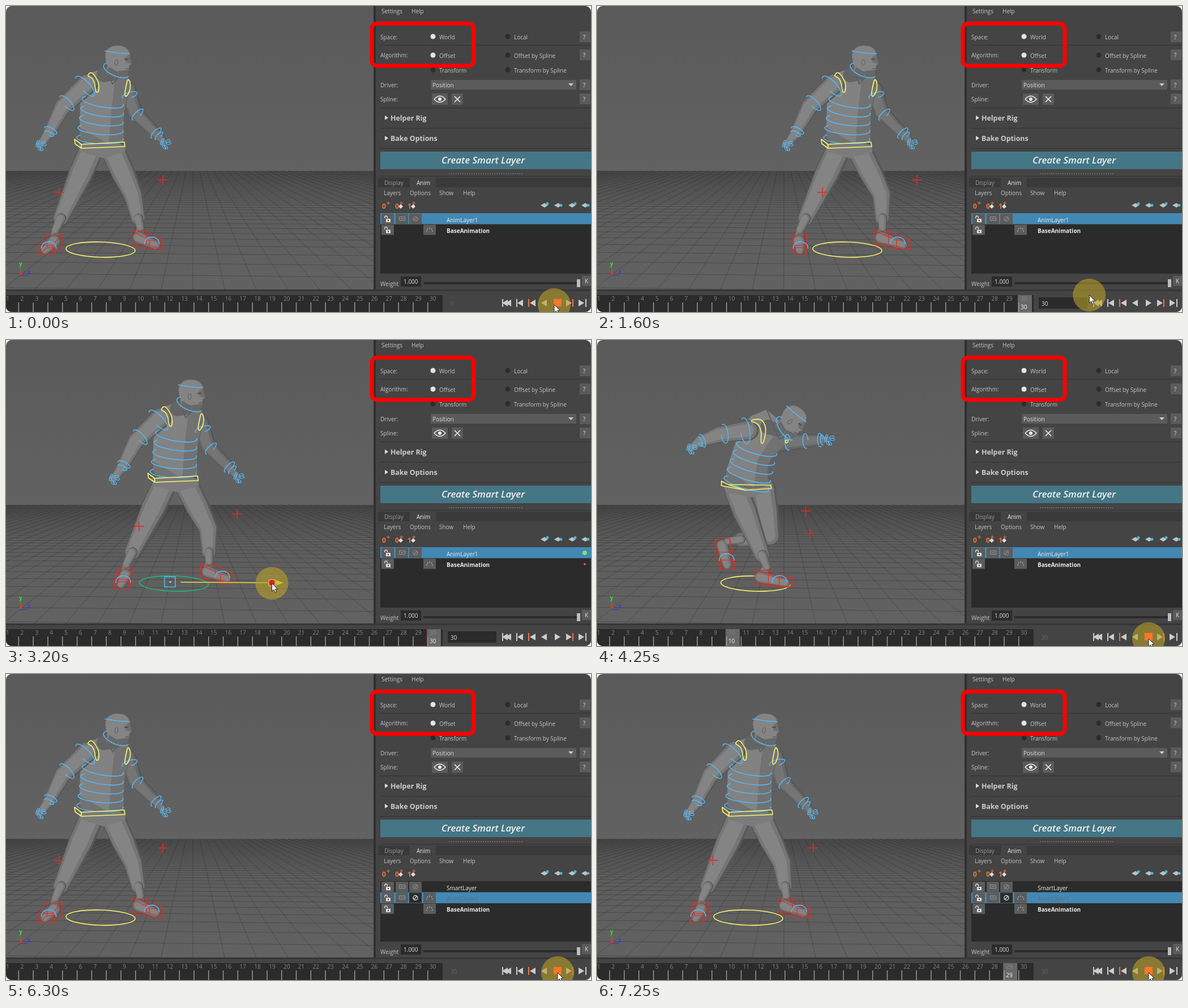
Animation of 1033x542 px, one loop 7.75 s. Source, as an HTML page with a canvas:

```html
<!DOCTYPE html>
<html lang="en">
<head>
<meta charset="utf-8">
<style>
html, body { margin: 0; width: 100%; height: 100%; overflow: hidden; background: #fff; }
canvas { display: block; }
</style>
</head>
<body>
<canvas id="stage" width="1033" height="542"></canvas>
<script>
const c = document.getElementById('stage').getContext('2d');
const LOOP = 7750, BLUE = '#52b8f5', YELLOW = '#f7f36e', RED = '#e8291f', ORANGE = '#f0743a';
const clamp = (v, a = 0, b = 1) => Math.min(b, Math.max(a, v));
const smooth = v => (v = clamp(v)) * v * (3 - 2 * v);
const mix = (a, b, k) => a + (b - a) * k;
const lerp = (p, q, k) => [mix(p[0], q[0], k), mix(p[1], q[1], k)];

// ---------- drawing helpers ----------
function rect(x, y, w, h, color) { c.fillStyle = color; c.fillRect(x, y, w, h); }
function trace(points, close) {
  c.beginPath();
  points.forEach(p => c.lineTo(p[0], p[1]));
  if (close) c.closePath();
}
function poly(points, color) { trace(points, true); c.fillStyle = color; c.fill(); }
function line(points, color, width = 1, close) {
  trace(points, close);
  c.strokeStyle = color; c.lineWidth = width; c.stroke();
}
function traceSmooth(points) {
  const n = points.length;
  c.beginPath();
  c.moveTo(...lerp(points[n - 1], points[0], .5));
  points.forEach((p, i) => c.quadraticCurveTo(...p, ...lerp(p, points[(i + 1) % n], .5)));
}
function loop(points, color, width) {
  traceSmooth(points);
  c.strokeStyle = color; c.lineWidth = width; c.stroke();
}
function disc(x, y, r, color) { c.beginPath(); c.arc(x, y, r, 0, 7); c.fillStyle = color; c.fill(); }
function oval(x, y, rx, ry, tilt, color, width = 1.5, from = 0, to = Math.PI * 2) {
  c.beginPath(); c.ellipse(x, y, rx, ry, tilt, from, to);
  c.strokeStyle = color; c.lineWidth = width; c.stroke();
}
function text(s, x, y, color = '#c4c4c4', size = 10, style = '') {
  c.font = `${style} ${size}px "Open Sans", "Noto Sans", sans-serif`;
  c.fillStyle = color; c.fillText(s, x, y);
}
function capsule(p, q, r1, r2, color) {
  const a = Math.atan2(q[1] - p[1], q[0] - p[0]), h = Math.PI / 2;
  c.beginPath();
  c.arc(...p, r1, a + h, a - h);
  c.arc(...q, r2, a - h, a + h);
  c.closePath(); c.fillStyle = color; c.fill();
}
function limb(joints, radii, shades = ['#595959', '#757575', '#848484']) {
  shades.forEach((color, layer) => {
    const scale = [1, .88, .62][layer];
    for (let i = 1; i < joints.length; i++) {
      const [p, q] = [joints[i - 1], joints[i]].map(j => [j[0] - layer, j[1]]);
      capsule(p, q, radii[i - 1] * scale, radii[i] * scale, color);
    }
  });
}
function ringOn(p, q, k, r) {
  const m = lerp(p, q, k), a = Math.atan2(q[1] - p[1], q[0] - p[0]) + Math.PI / 2;
  oval(...m, r, r * .36, a, BLUE, 1.5, -.4, 4.6);
}
function cross(x, y) {
  line([[x - 9, y], [x + 9, y]], RED, 1.5);
  line([[x, y - 9], [x, y + 9]], RED, 1.5);
}

// ---------- character ----------
// Pairs of poses, x relative to the ground control: standing, crouched.
const POSES = {
  torso: [[9,108, -25,122, -36,165, -36,190, -37,215, -38,244, 43,246, 41,215, 42,190, 46,165, 57,133, 39,118],
          [20,123, -20,140, -34,178, -44,205, -51,230, -56,259, 26,263, 21,238, 24,215, 40,198, 60,180, 65,163]],
  armL: [[-22,137, -66,178, -91,226, -106,246], [-12,160, -62,167, -98,180, -113,192]],
  armR: [[48,148, 61,188, 103,230, 114,243], [48,182, 85,179, 118,177, 130,176]],
  hips: [[-17,257, 23,258], [-32,270, 14,264]],
  head: [[29,96, 19,122], [64,142, 40,160]],
  clavL: [[-24,124, -17,116, -9,125, -3,137, -3,153, -9,153, -10,138, -15,127],
          [-12,143, 8,139, 16,147, 19,160, 14,184, 9,183, 11,162, 5,148]],
  clavR: [[48,128, 53,136, 52,150, 46,161, 42,158, 45,142], [54,177, 58,177, 58,180, 55,183, 53,181, 53,179]],
  belt: [[-34,245, 42,241, 43,249, -34,252, -45,244, -46,236], [-48,256, 27,257, 28,263, -18,266, -60,258, -60,250]]
};
function pose(name, w, x) {
  const [a, b] = POSES[name], out = [];
  for (let i = 0; i < a.length; i += 2) out.push([x + mix(a[i], b[i], w), mix(a[i + 1], b[i + 1], w)]);
  return out;
}
function knee(hip, ankle, thigh, shin) {
  const dx = ankle[0] - hip[0], dy = ankle[1] - hip[1], d = Math.hypot(dx, dy);
  if (d >= thigh + shin) return lerp(hip, ankle, thigh / (thigh + shin));
  const a = (thigh ** 2 - shin ** 2 + d * d) / (2 * d), h = Math.sqrt(Math.max(0, thigh ** 2 - a * a));
  return [hip[0] + (dx * a + dy * h) / d, hip[1] + (dy * a - dx * h) / d];
}
function shoe(ankle, heel, toe) {
  const at = o => [ankle[0] + o[0], ankle[1] + o[1]];
  limb([ankle, at(heel)], [7, 9]);
  limb([at(heel), at(toe)], [11, 8]);
  return [at(heel), at(toe)];
}
function footBox([heel, toe]) {
  const box = ([x, y], w, h) => [[x - w, y - h], [x + w, y - h], [x + w, y + h], [x - w, y + h]];
  const back = box(heel, 13, 12), front = box(toe, 12, 8);
  line(back, RED, 1.2, true);
  line(front, RED, 1.2, true);
  back.forEach((p, i) => line([p, front[i]], RED, 1.2));
  const m = lerp(heel, toe, .72);
  oval(m[0] + 1, m[1] + 1, 13, 11, 0, BLUE, 1.6, 3, 6.4);
}
function drawHead([x, y], tilt) {
  c.save(); c.translate(x, y); c.rotate(tilt);
  const face = new Path2D('M-21-5C-22-20-10-27 2-26C14-26 22-19 22-10L23-4L26 6L22 9L22 15L19 24Q16 31 7 28L0 20L-4 30L-19 25Q-15 12-19 5Z');
  c.fillStyle = '#848484'; c.fill(face);
  c.strokeStyle = '#666'; c.lineWidth = 1; c.stroke(face);
  c.save(); c.clip(face);
  poly([[0, 20], [22, 16], [18, 32], [-20, 32], [-14, 12]], '#686868');
  poly([[22, -12], [13, -3], [16, 4], [26, 6]], '#707070');
  line([[13, -2], [20, -2]], '#4c4c4c', 2);
  line([[15, 15], [22, 14]], '#555', 1.3);
  oval(-1, 4, 2.5, 5, .2, '#666', 1.2);
  c.restore();
  line([[-22, -16], [0, -13], [23, -12]], BLUE, 1.6);
  oval(-1, 18, 24, 10, .38, BLUE, 1.6, .1, 3.8);
  c.restore();
}

function drawCharacter(f, scale, shift, selected) {
  const w = f < 9 ? smooth(f / 9) : f < 11 ? 1 : 1 - smooth((f - 11) / 17);
  // The arms swing past their rest pose before settling.
  const armW = f < 11 ? w : w - .3 * Math.sin(Math.PI * (f - 11) / 19);
  const place = (start, travel) => start + travel * scale - shift;
  const root = place(167, 275 * (1 - (1 - f / 30) ** 2.4));
  const stepL = clamp(f / 8), stepR = clamp((f - 6) / 14);
  const travelL = 271 * smooth(stepL), travelR = 267 * smooth(stepR);
  const raise = Math.min(1, 1.7 * Math.sin(Math.PI * stepR));
  const ankleL = [place(88, travelL), mix(397, 402, w) - 25 * Math.sin(Math.PI * stepL)];
  const ankleR = [place(238, travelR), 393 - 37 * raise];
  const drift = (ankleL[0] - 88) / 271;
  oval(root, 431.5, 61, 13.5, .03, selected ? '#1fb87a' : YELLOW, 1.6);

  const torso = pose('torso', w, root), armL = pose('armL', armW, root), armR = pose('armR', armW, root);
  const [hipL, hipR] = pose('hips', w, root), [head, neck] = pose('head', w, root);
  const kneeL = knee(hipL, ankleL, mix(87, 76, w), 66), kneeR = knee(hipR, ankleR, 84, mix(60, 74, raise));

  line([hipR, [kneeR[0] - 9, kneeR[1]]], '#a33', 1);
  limb(armR, [15, 13, 9, 6], ['#555', '#686868', '#757575']);
  const footR = shoe(ankleR, lerp([-3, 17], [-11, 8], raise), lerp([27 + 9 * drift, 30], [-2, 42], raise));
  limb([hipR, lerp(hipR, kneeR, .5), kneeR, lerp(kneeR, ankleR, .7)], [22, 21, 17, 13]);
  limb([lerp(kneeR, ankleR, .7), ankleR], [8, 7]);
  const footL = shoe(ankleL, lerp([-2, 19], [-11, 18], w), lerp([-18 + 18 * drift, 35], [33, 28], w));
  limb([hipL, lerp(hipL, kneeL, .5), kneeL, lerp(kneeL, ankleL, .65)], [22, 22, 18, 14]);
  limb([lerp(kneeL, ankleL, .65), ankleL], [9, 7]);
  poly([torso[5], torso[6], [hipR[0] + 21, hipR[1]], lerp(hipL, [hipR[0], hipR[1] + 22], .55), [hipL[0] - 20, hipL[1]]], '#7b7b7b');

  traceSmooth(torso);
  c.fillStyle = '#727272'; c.fill();
  c.strokeStyle = '#606060'; c.lineWidth = 1.2; c.stroke();
  poly([torso[0], lerp(torso[1], torso[0], .3), torso[2], torso[4], lerp(torso[5], torso[6], .65), lerp(torso[8], torso[3], .3), lerp(torso[11], torso[0], .4)], '#828282');
  capsule(neck, lerp(neck, torso[1], .3), 11, 13, '#646464');
  line([torso[0], [neck[0] + 2, neck[1] + 16], torso[11]], '#5e5e5e', 2);
  limb(armL, [18, 15, 10, 6]);
  drawHead(head, .02 + .57 * Math.sqrt(w));

  // control curves
  for (let i = 0; i < 5; i++) {
    const k = i / 4;
    oval(root + mix(mix(4, -1, k), mix(2, -16, k), w), mix(mix(170, 235, k), mix(193, 255, k), w),
      mix(37, 41, k), 9, mix(mix(.17, .05, k), .28, w), BLUE, 1.6, -.25, 3.7);
  }
  ringOn(armL[0], armL[1], .12, 23);
  ringOn(armL[0], armL[1], .85, 17);
  ringOn(armR[0], armR[1], .25, 14);
  ringOn(armR[1], armR[2], .1, 13);
  for (const arm of [armL, armR]) {
    ringOn(arm[1], arm[2], .88, 12);
    ringOn(arm[1], arm[2], 1, 9);
    for (let i = 0; i < 6; i++)
      oval(arm[3][0] + 6 * Math.cos(i * 1.9), arm[3][1] + 7 * Math.sin(i * 1.9), 4, 2, i, BLUE, 1.2);
  }
  c.lineJoin = 'round';
  loop(pose('clavL', w, root), YELLOW, 1.7);
  loop(pose('clavR', w, root), YELLOW, 1.7);
  const belt = pose('belt', w, root);
  line(belt, YELLOW, 1.7, true);
  line([belt[0], belt[3]], YELLOW, 1.7);
  footBox(footR);
  footBox(footL);
  cross(ankleL[0] + mix(6 + 33 * drift, 68, w), mix(330, 303, w));
  cross(ankleR[0] + mix(39 + 21 * drift, 143, raise), mix(308, 343, raise));

  if (selected) {
    line([[root + 12, 429], [root + 183, 430]], '#e6e03c', 1.5);
    c.strokeStyle = BLUE; c.strokeRect(root - 16.5, 419.5, 19, 18);
    rect(root - 8, 427, 3, 3, '#9cf');
    poly([[root + 180, 425], [root + 193, 430], [root + 180, 435]], '#f4ec3a');
    c.strokeStyle = '#eee'; c.lineWidth = 1; c.strokeRect(root + 167.5, 424.5, 11, 11);
  }
  return root;
}

// ---------- interface ----------
function drawViewport() {
  const sky = c.createLinearGradient(0, 0, 0, 292);
  sky.addColorStop(0, '#5a5a5a'); sky.addColorStop(1, '#626262');
  rect(0, 0, 649, 293, sky);
  const floor = c.createLinearGradient(0, 292, 0, 502);
  floor.addColorStop(0, '#575757'); floor.addColorStop(.3, '#5d5d5d'); floor.addColorStop(1, '#626262');
  rect(0, 292, 649, 211, floor);
  c.save();
  c.beginPath(); c.rect(0, 292, 649, 211); c.clip();
  for (let i = -40; i <= 40; i++)
    line([[330 + i * 12, 292], [330 + i * 56, 502]], 'rgba(35,35,35,.42)', .8);
  for (let z = 1; z < 8; z += .12) {
    const y = 262 + 240 / z;
    line([[0, y - 3 / z], [649, y + 5 / z]], `rgba(35,35,35,${.5 - .04 * z})`, .8);
  }
  c.restore();
  text('y', 23, 460, '#3ddc3d', 10, 'bold');
  text('z', 38, 475, '#3434f0', 10, 'bold');
  line([[26, 463], [26, 476]], '#3a3', 1);
  line([[26, 477], [39, 477]], '#33c', 1);
  rect(24, 470, 5, 6, '#d33a2c');
}

function radio(x, y, label, on) {
  disc(x, y, 4.5, on ? '#e4e4e4' : '#2c2c2c');
  text(label, x + 11, y + 5);
}
function rule(y) { rect(660, y, 373, 1, '#333'); }
function iconButton(x, y, kind, dark) {
  rect(x, y, 22, 18, dark ? '#2b2b2b' : '#5c5c5c');
  const m = x + 11, n = y + 9;
  if (kind === 'lock') {
    rect(m - 3, n, 8, 6, '#e0e0e0');
    oval(m - 3, n - 1, 2.5, 4, 0, '#e0e0e0', 1.3, Math.PI, 6.3);
    rect(m, n + 2, 2, 2, '#333');
  } else if (kind === 'ghost') {
    c.strokeStyle = '#9a9a9a'; c.lineWidth = 1; c.strokeRect(m - 4.5, n - 3.5, 10, 6);
    rect(m - 2, n - 1, 5, 1, '#9a9a9a');
  } else if (kind === 'mute') {
    const color = dark ? '#eee' : '#8b8b8b';
    oval(m, n, 4, 4, 0, color, 1.2);
    line([[m - 3, n + 3], [m + 3, n - 3]], color, 1.2);
  } else for (let i = 0; i < 5; i++) disc(m + 5 * Math.cos(i * .8 + 3.1), n + 2 + 5 * Math.sin(i * .8 + 3.1), 1, '#aaa');
}

function drawPanel(s) {
  rect(649, 0, 384, 542, '#444');
  rect(649, 0, 4, 503, '#303030');
  text('Settings', 663, 13); text('Help', 716, 13);
  text('Space:', 661, 59); text('Algorithm:', 661, 91);
  radio(754, 54, 'World', true); radio(886, 54, 'Local');
  radio(754, 87, 'Offset', true); radio(886, 87, 'Offset by Spline');
  radio(754, 113, 'Transform'); radio(886, 113, 'Transform by Spline');
  [69, 180, 216, 252, 301].forEach(rule);
  [45, 77, 130, 155].forEach(y => { rect(1013, y, 19, 19, '#5b5b5b'); text('?', 1019, y + 14, '#ddd'); });
  text('Driver:', 661, 144); text('Spline:', 661, 169);
  rect(750, 131, 257, 17, '#5b5b5b'); text('Position', 753, 144, '#ddd');
  poly([[993, 137], [1002, 137], [997.5, 142]], '#ccc');
  rect(752, 155, 28, 20, '#5b5b5b'); rect(787, 155, 20, 20, '#5b5b5b');
  c.beginPath(); c.moveTo(756, 165); c.quadraticCurveTo(766, 154, 776, 165); c.quadraticCurveTo(766, 176, 756, 165);
  c.strokeStyle = '#eee'; c.lineWidth = 1.5; c.stroke(); disc(766, 165, 3, '#eee');
  line([[792, 160], [802, 170]], '#eee', 1.6); line([[802, 160], [792, 170]], '#eee', 1.6);
  [['Helper Rig', 198], ['Bake Options', 234]].forEach(([label, y]) => {
    poly([[669, y - 4], [675, y], [669, y + 4]], '#ddd');
    text(label, 679, y + 5, '#ccc', 12.4, 'bold');
  });
  rect(661, 258, 372, 31, s.hover ? '#4a8997' : '#457685');
  text('Create Smart Layer', 769, 279, '#f0f0f0', 16.8, 'italic 600');
  for (let x = 782; x < 912; x += 4) rect(x, 296, 2, 2, '#6a6a6a');
  rect(657, 304, 376, 17, '#3a3a3a'); rect(657, 304, 56, 17, '#393939'); rect(713, 304, 46, 17, '#444');
  text('Display', 668, 317, '#999'); text('Anim', 725, 317, '#eee');
  ['Layers', 'Options', 'Show', 'Help'].forEach((m, i) => text(m, [667, 713, 765, 807][i], 335));
  [664, 687, 709].forEach((x, i) => {
    text('001'[i], x, 359, ORANGE, 12, 'bold');
    line([[x + 8, 349], [x + 14, 349]], ORANGE); line([[x + 11, 346], [x + 11, 352]], ORANGE);
    if (i) poly([[x + 6, 355], [x + 10, 351], [x + 14, 355], [x + 10, 359]], '#ddd');
  });
  [951, 975, 1000, 1023].forEach((x, i) => {
    poly([[x - 7, 353], [x, 349], [x + 6, 353], [x, 357]], '#b5c4c9');
    disc(x + 5, 350 + (i % 2) * 3, 2.5, '#45b8d8');
  });

  rect(661, 367, 372, 107, '#2b2b2b');
  rect(661, 367 + (s.smart ? 19.5 : 0), 372, 19.5, '#4388b3');
  const rows = s.smart ? ['SmartLayer', 'AnimLayer1', 'BaseAnimation'] : ['AnimLayer1', 'BaseAnimation'];
  rows.forEach((name, i) => {
    const y = 368 + i * 19.4, base = i === rows.length - 1, muted = s.smart && i === 1;
    iconButton(663, y, 'lock');
    if (!base) { iconButton(688, y, 'ghost'); iconButton(712, y, 'mute', muted); }
    if (base || muted) iconButton(737, y, 'dots');
    text(name, 778, y + 14.5, muted ? '#576f82' : '#eaeaea', 10, base ? 'bold' : '');
  });
  if (s.selected) { disc(1022, 377, 4, '#7fe06a'); disc(1022, 397, 2, '#e0533c'); }
  text('Weight', 661, 496);
  rect(697, 479, 36, 18, '#2b2b2b'); text('1.000', 702, 492, '#ddd');
  rect(737, 489, 275, 4, '#2b2b2b'); rect(1008, 484, 6, 14, '#bdbdbd');
  rect(1017, 478, 16, 18, '#5b5b5b'); text('K', 1022, 491, '#ddd');

  c.beginPath(); c.roundRect(646, 31, 180, 75, 9);
  c.strokeStyle = '#f00'; c.lineWidth = 7; c.stroke();
}

function drawTimeline(s) {
  rect(0, 502, 1033, 40, '#444');
  rect(0, 502, 1033, 3, '#363636');
  rect(0, 512, 771, 30, '#2b2b2b');
  const cell = n => 227 + 25.8 * (n - 10);
  if (s.frame > 0) rect(cell(s.frame), 512, 25, 30, '#686868');
  for (let n = 1; n <= 30; n++) {
    rect(cell(n) + 1, 525, 1.5, 17, '#999');
    text(n, n === 1 ? 0 : cell(n) + 5, 522, '#858585');
  }
  if (s.frame > 0) text(s.frame, cell(s.frame) + 5, 537, '#f2f2f2');
  if (s.selected) rect(743, 512, 1.5, 30, '#c33');
  if (!s.playing) rect(780, 516, 86, 20, '#2b2b2b');
  text(s.field, 785, 531, s.playing ? '#666' : '#ddd');

  const tri = (x, d) => poly([[x - 5 * d, 520], [x + 5 * d, 526], [x - 5 * d, 532]], '#ccc');
  const bar = (x, color = '#ccc') => rect(x, 519, 2, 14, color);
  bar(876); tri(881, -1); tri(887, -1);
  bar(901); tri(908, -1);
  bar(922, ORANGE); tri(930, -1);
  tri(950, -1);
  if (!s.playing) tri(974, 1);
  tri(994, 1); bar(1000, ORANGE);
  tri(1016, 1); bar(1023);
}

function drawCursor(s, root) {
  const { x, y } = s;
  disc(x, y, 29, 'rgba(188,163,40,.58)');
  if (s.playing) rect(967, 519, 14, 13, '#ff7628');
  if (s.selected) disc(root + 173, 430, 5, '#f01818');
  if (s.click) oval(x, y, 10, 10, 0, '#e8261c', 3);
  const arrow = [[0, 0], [0, 14], [3.4, 11], [6, 16.5], [8.3, 15.4], [5.8, 10.2], [10, 10]].map(p => [x + p[0], y + p[1]]);
  poly(arrow, '#fff');
  line(arrow, '#222', 1, true);
}

// ---------- timeline of the screen capture ----------
function stateAt(t) {
  const s = { frame: 30, scale: 1, shift: 0, field: 30, x: 974, y: 529,
    playing: t < 1500 || (t >= 3950 && t < 5350) || t >= 6300, smart: t >= 5550 };
  const run = (start, first) => clamp(Math.round(first + (t - start) * .03), 0, 30);
  if (t < 1500) {
    Object.assign(s, { frame: run(0, 0), field: 0, x: 968 });
  } else if (t < 3950) {
    s.shift = 175 * smooth((t - 2350) / 1150);
    s.selected = t >= 1850;
    [s.x, s.y] = t < 1850
      ? lerp([968, 529], [470, 443], smooth((t - 1500) / 350))
      : lerp([470, 443], [615, 431], smooth((t - 1900) / 350));
    s.x -= s.shift;
    s.click = t >= 1800 && t < 1900;
  } else if (t < 5350) {
    s.frame = run(3950, 1);
    s.shift = 175 * s.frame / 30;
  } else if (t < 6300) {
    Object.assign(s, { scale: .364, x: 821, y: 271, hover: true, click: t < 5500 });
  } else {
    Object.assign(s, { scale: .364, frame: run(6300, 0) });
  }
  return s;
}

function draw(now) {
  const s = stateAt(Math.floor(now % LOOP / 50) * 50);
  c.fillStyle = '#fff'; c.fillRect(0, 0, 1033, 542);
  c.save();
  c.beginPath(); c.roundRect(0, 0, 1033, 542, 10); c.clip();
  drawViewport();
  const root = drawCharacter(s.frame, s.scale, s.shift, s.selected);
  drawPanel(s);
  drawTimeline(s);
  drawCursor(s, root);
  c.restore();
  requestAnimationFrame(draw);
}
requestAnimationFrame(draw);
</script>
</body>
</html>
```
